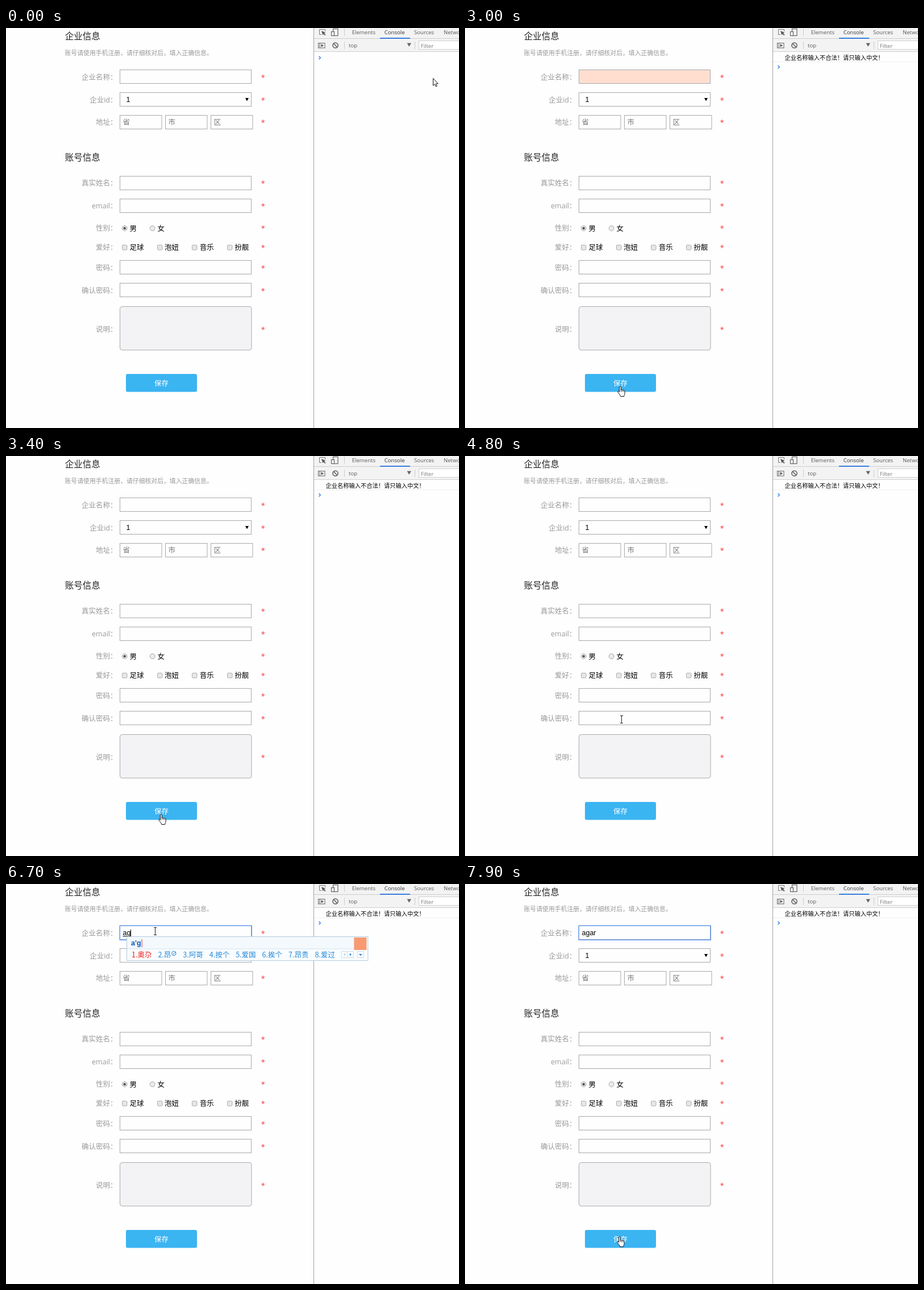
These frames come from a looping animation (797 by 703 pixels, 8 s). An HTML page with a canvas:

```html
<!DOCTYPE html>
<html lang="zh-CN">
<head>
<meta charset="utf-8">
<title>表单校验</title>
<style>
html, body { margin: 0; width: 100%; height: 100%; overflow: hidden; background: #fefefe; }
canvas { display: block; }
</style>
</head>
<body>
<canvas id="stage" width="797" height="703"></canvas>
<script>
const ctx = document.getElementById('stage').getContext('2d');
const LOOP = 8000;
const CJK = '"Noto Sans CJK SC", "Noto Sans CJK", sans-serif';
const UI = '"Open Sans", ' + CJK;
const ARIAL = '"Liberation Sans", Arial, sans-serif';
const BORDER = '#a9a9a9';

// Time, x, y, pointer; each entry holds until the next one.
const POINTER = [
  [0, 751, 88, 'arrow'], [100, 600, 330, 'arrow'], [200, 335, 680, 'arrow'], [300, 0, 0, ''],
  [500, 259, 671, 'arrow'], [600, 265, 641, 'arrow'], [700, 267, 631, 'hand'], [1300, 268, 629, 'hand'],
  [4800, 275, 463, 'beam'], [4900, 287, 337, 'arrow'], [5000, 282, 226, 'arrow'], [5100, 273, 142, 'arrow'],
  [5200, 266, 95, 'beam'], [5300, 262, 83, 'beam'],
  [7300, 263, 106, 'arrow'], [7400, 268, 205, 'arrow'], [7500, 276, 355, 'arrow'], [7600, 281, 500, 'arrow'],
  [7700, 278, 590, 'arrow'], [7800, 270, 614, 'hand'], [7900, 267, 619, 'hand']
];

// Time, typed letters, input-method reading, candidates.
const TYPING = [
  [0, ''],
  [6500, 'a'],
  [6600, 'a', 'a', '啊 阿 吖 嗄 腌 锕 呵 安'],
  [6700, 'ag', "a'g", '奥尕 昂✓ 阿哥 按个 爱国 挨个 昂贵 爱过'],
  [6800, 'aga', "a'ga", '阿嘎 阿噶 阿尕 啊嘎 阿旮 阿伽 阿'],
  [6900, 'agar', "a'ga'r", '阿嘎人 阿嘎 阿噶 阿尕 啊嘎 阿旮 阿伽'],
  [7200, 'agar']
];

// Label and its vertical centre.
const LABELS = [
  ['企业名称', 86], ['企业id', 126], ['地址', 165.5], ['真实姓名', 272.5], ['email', 312.5],
  ['性别', 351], ['爱好', 385], ['密码', 421], ['确认密码', 461], ['说明', 529.5]
];

const HAND = new Path2D('M3.5 11V1.9a1.3 1.3 0 0 1 2.7 0V7.3c.3-1 2.2-.9 2.4.3.5-.9 2.2-.6 2.4.6' +
  '.6-.7 2.1-.3 2.1 1V13c0 2-1 3-1.4 5.5H5.8C5.3 16 2.6 13.5 1 11c-.9-1.6.9-2.6 2.5-.6z');
const ARROW = new Path2D('M.5.5V13.2L3.4 10.6L5.3 15L7.3 14.1L5.4 9.8H9.3Z');

const at = (list, t) => list.filter(k => k[0] <= t).pop();

function rect(x, y, w, h, color) {
  ctx.fillStyle = color;
  ctx.fillRect(x, y, w, h);
}

function frame(x, y, w, h, color = BORDER, width = 1) {
  ctx.strokeStyle = color;
  ctx.lineWidth = width;
  ctx.strokeRect(x, y, w, h);
}

function rounded(x, y, w, h, r, fill, stroke) {
  ctx.beginPath();
  ctx.roundRect(x, y, w, h, r);
  ctx.fillStyle = fill;
  ctx.fill();
  if (stroke) {
    ctx.strokeStyle = stroke;
    ctx.lineWidth = 1;
    ctx.stroke();
  }
}

function text(str, x, y, size, color, font = UI, align = 'left') {
  ctx.font = size + 'px ' + font;
  ctx.fillStyle = color;
  ctx.textAlign = align;
  ctx.fillText(str, x, y);
}

// Text placed by its vertical centre.
function mid(str, x, cy, size, color, font = UI, align = 'left') {
  text(str, x, cy + size * .375, size, color, font, align);
}

function poly(points, fill) {
  ctx.beginPath();
  for (let i = 0; i < points.length; i += 2) ctx.lineTo(points[i], points[i + 1]);
  ctx.fillStyle = fill;
  ctx.fill();
}

function line(points, color, width = 1) {
  ctx.beginPath();
  for (let i = 0; i < points.length; i += 2) ctx.lineTo(points[i], points[i + 1]);
  ctx.strokeStyle = color;
  ctx.lineWidth = width;
  ctx.stroke();
}

function disc(x, y, r, fill, stroke, width = 1) {
  ctx.beginPath();
  ctx.arc(x, y, r, 0, 7);
  if (fill) {
    ctx.fillStyle = fill;
    ctx.fill();
  }
  if (stroke) {
    ctx.strokeStyle = stroke;
    ctx.lineWidth = width;
    ctx.stroke();
  }
}

function drawForm(alert) {
  text('企业信息', 103.7, 19.5, 15.5, '#222', '300 '.slice(4) + CJK);
  mid('账号请使用手机注册，请仔细核对后，填入正确信息。', 103.5, 43.5, 10.85, '#999', CJK);
  text('账号信息', 103.7, 232.5, 15.5, '#222', CJK);

  for (const [label, cy] of LABELS) {
    mid(label + '：', 195.5, cy, 12.5, '#999', UI, 'right');
    text('*', 448.7, cy + 5.8, 12.5, '#f33');
  }

  if (alert) rect(201, 74, 231, 24, `rgba(255,160,122,${alert})`);
  for (const y of [73.5, 113.5, 260.5, 300.5, 408.5, 448.5]) frame(200.5, y, 231, 24);
  text('1', 211.5, 130.3, 12.5, '#000', ARIAL);
  poly([421, 123, 427, 123, 424, 128.5], '#000');

  ['省', '市', '区'].forEach((name, i) => {
    const x = 200.5 + i * 80;
    frame(x, 153.5, 73.5, 24);
    mid(name, x + 5, 165.5, 12.5, '#757575', CJK);
  });

  ['男', '女'].forEach((name, i) => {
    const x = 208.7 + i * 49;
    disc(x, 352, 4.4, '#ececec', '#a2a2a2');
    if (!i) disc(x, 352, 2.3, '#555');
    mid(name, x + 8.8, 352, 12.5, '#000', CJK);
  });

  ['足球', '泡妞', '音乐', '扮靓'].forEach((name, i) => {
    const x = 204.5 + i * 61.6;
    rounded(Math.floor(x) + .5, 381.5, 8.5, 8.5, 1.5, '#e6e6e6', '#adadad');
    mid(name, x + 13, 385.5, 12.5, '#000', CJK);
  });

  rounded(200.5, 489.5, 231.5, 76.5, 4, '#f3f2f4', BORDER);
  rounded(211, 608, 125, 31.5, 3, '#3bb4f2');
  mid('保存', 273.5, 624.2, 12.5, '#fff', CJK, 'center');
}

function drawConsole(logged) {
  rect(541, 0, 1, 703, '#a3a3a3');
  rect(542, 0, 255, 41, '#f3f3f3');
  rect(542, 18, 255, 1, '#ccc');
  rect(542, 41, 255, 1, '#d0d0d0');
  rect(658, 17, 53, 2, '#3b7de0');

  line([555, 11.5, 551.5, 11.5, 551.5, 2.5, 561.5, 2.5, 561.5, 6], '#777');
  poly([555, 5, 562.5, 8.3, 559.8, 9.3, 562.5, 12, 561.3, 13.2, 558.6, 10.5, 557.5, 12.8], '#555');
  frame(575.5, 1.5, 8.5, 12, '#666', 1.2);
  rect(572, 6, 6, 8, '#f3f3f3');
  frame(572.5, 6.5, 5, 7, '#666', 1.2);
  rect(595, 1, 1, 13, '#ccc');

  const ink = '#5a5a5a';
  text('Elements', 608.7, 11.2, 9.6, ink);
  text('Console', 665.7, 11.2, 9.6, '#333');
  text('Sources', 718, 11.2, 9.6, ink);
  text('Network', 770, 11.2, 9.6, ink);

  frame(549.5, 26.5, 11.5, 8.5, '#666');
  rect(551.5, 27, 1, 8, '#666');
  poly([554.5, 28, 558.8, 30.8, 554.5, 33.5], '#555');
  disc(579.5, 30.5, 4.6, null, '#5a5a5a', 1.5);
  line([576.3, 27.3, 582.7, 33.7], '#5a5a5a', 1.5);
  rect(595, 24, 1, 13, '#ccc');
  text('top', 603, 33.8, 9.6, ink);
  poly([705.5, 26.5, 713, 26.5, 709.2, 32.8], '#666');
  rect(719, 24, 1, 13, '#ccc');
  rect(727, 22, 70, 16, '#fff');
  frame(726.5, 22.5, 80, 15, '#d0d0d0');
  text('Filter', 729.8, 34.5, 9.5, '#777');

  if (logged) {
    mid('企业名称输入不合法！请只输入中文！', 562.5, 51.8, 10.25, '#000', CJK);
    rect(542, 59, 255, 1, '#f0f0f0');
  }
  const y = logged ? 68.5 : 52.2;
  line([550.5, y - 2.7, 553.3, y, 550.5, y + 2.7], '#3b86f0', 1.5);
}

function drawCandidates(reading, words) {
  ctx.font = '12.5px ' + CJK;
  const items = words.split(' ').map((word, i) => {
    const ticked = word.endsWith('✓');
    const label = (i + 1) + '.' + word.replace('✓', '');
    return { label, ticked, width: ctx.measureText(label).width };
  });
  const nav = items.reduce((x, it) => x + it.width + (it.ticked ? 21 : 11), 221);
  const right = nav + 46.5;

  rect(212, 93, right - 212, 42, '#fafdff');
  rect(212, 93, right - 212, 21, '#f3f9fd');
  rect(212, 113.5, right - 212, 1, '#d3e3ef');
  frame(212.5, 92.5, right - 212, 42, '#b3cbdd');

  text(reading, 220, 107.5, 12.5, '#0a55b5', ARIAL.replace(/^/, ''), 'left');
  ctx.font = 'bold 12.5px ' + ARIAL;
  rect(219, 96, 60, 15, '#f3f9fd');
  ctx.fillStyle = '#0a55b5';
  ctx.fillText(reading, 220, 107.5);
  rect(221 + ctx.measureText(reading).width, 97, 1, 14, '#e33');
  rect(right - 24, 94, 22, 22, '#f79a72');

  let x = 221;
  items.forEach((it, i) => {
    mid(it.label, x, 124, 12.5, i ? '#2289d8' : '#f01818', CJK);
    x += it.width + 11;
    if (it.ticked) {
      disc(x - 6, 122, 3.8, null, '#2289d8');
      line([x - 8, 122, x - 6.5, 123.7, x - 2.5, 119], '#2289d8');
      x += 10;
    }
  });

  frame(nav + .5, 118.5, 21, 11, '#c9dcea');
  rect(nav + 10.5, 119, 1, 11, '#c9dcea');
  poly([nav + 7, 121.5, nav + 7, 126.5, nav + 4, 124], '#b5cbdc');
  poly([nav + 15, 121.5, nav + 15, 126.5, nav + 18, 124], '#1f7fd0');
  frame(nav + 28.5, 118.5, 11, 11, '#c9dcea');
  poly([nav + 31, 123, nav + 37, 123, nav + 34, 126], '#1f7fd0');
}

function drawTyping(t) {
  frame(200.25, 73.25, 232, 25, '#5f96ee', 1.4);
  const [, typed, reading, words] = at(TYPING, t);
  text(typed, 205.5, 90, 12.5, '#000', ARIAL);
  const end = 205.5 + ctx.measureText(typed).width;
  const composing = t >= 6500 && t < 7200;
  if (composing) rect(205.5, 91.5, end - 205.5, 1, '#000');
  const caretOff = (t >= 6000 && t < 6500) || t >= 7700;
  if (!caretOff) rect(Math.round(end), 80, 1, 13, '#000');
  if (reading) drawCandidates(reading, words);
}

function drawPointer([, x, y, kind]) {
  if (!kind) return;
  if (kind === 'beam') {
    line([x - 2, y - 6.5, x + 3, y - 6.5], '#222');
    line([x + .5, y - 6.5, x + .5, y + 6.5], '#222');
    line([x - 2, y + 6.5, x + 3, y + 6.5], '#222');
    return;
  }
  const shape = kind === 'hand' ? HAND : ARROW;
  ctx.save();
  ctx.translate(x, y);
  ctx.fillStyle = '#fff';
  ctx.fill(shape);
  ctx.strokeStyle = '#111';
  ctx.lineWidth = 1;
  ctx.stroke(shape);
  if (kind === 'hand') {
    line([6.2, 7, 6.2, 10.5], '#111', .8);
    line([8.6, 7.6, 8.6, 10.5], '#111', .8);
    line([11, 8.2, 11, 10.5], '#111', .8);
  }
  ctx.restore();
}

// Warning tint: rises for 200 ms, then fades, in 100 ms steps.
function tint(t) {
  const step = Math.floor((t - 3000) / 100);
  return [.35, .75, 1, .45][step] || 0;
}

function render(now) {
  const t = now % LOOP;
  rect(0, 0, 797, 703, '#fefefe');
  drawForm(tint(t));
  drawConsole(t >= 3000);
  if (t >= 5500) drawTyping(t);
  drawPointer(at(POINTER, t));
}

let start;
function tick(now) {
  start ??= now;
  render(now - start);
  requestAnimationFrame(tick);
}
requestAnimationFrame(tick);
</script>
</body>
</html>
```
